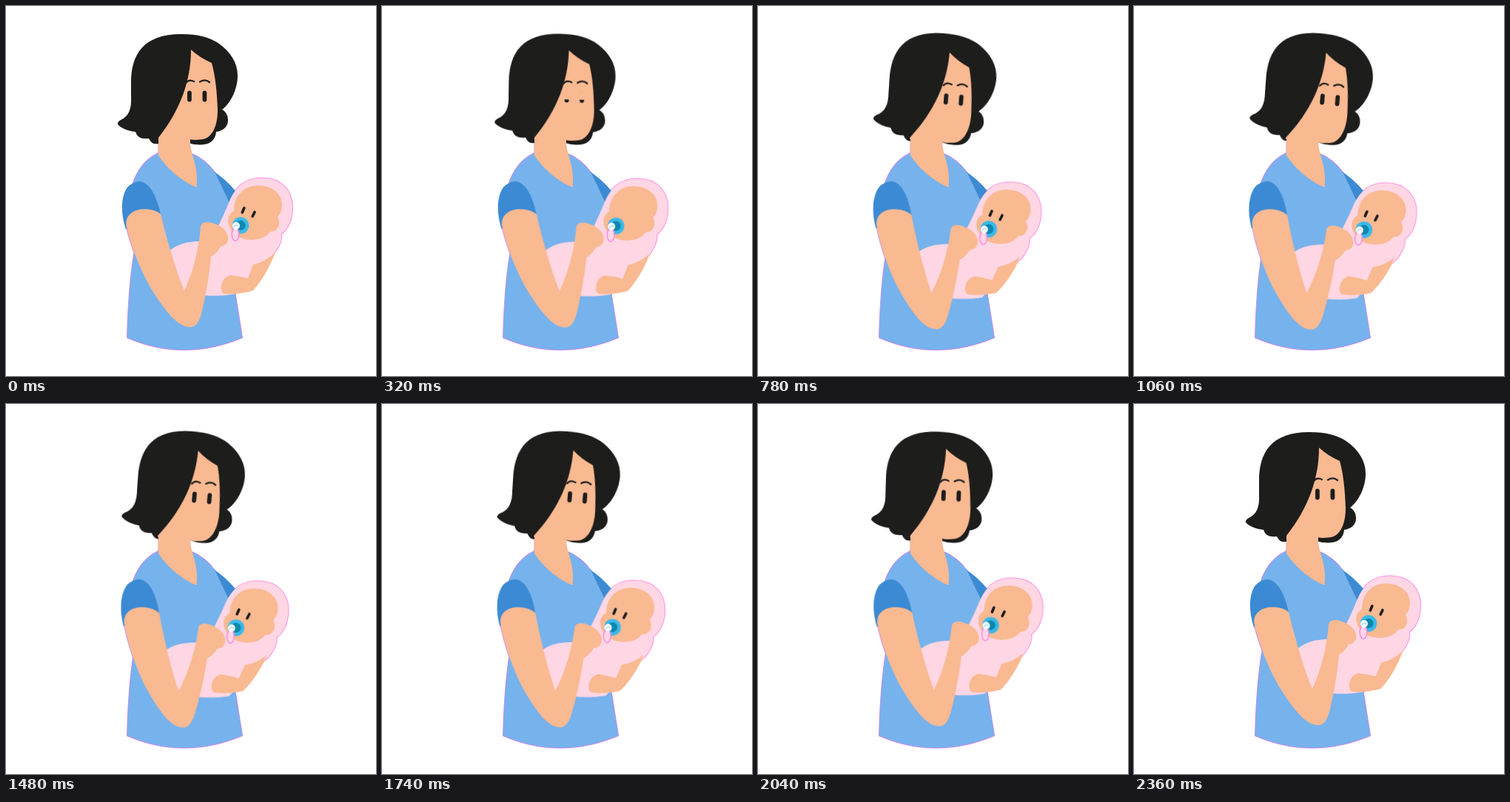
Write an HTML page that moves like this. It is 500x500 px and loops after 2380 ms.

```html
<!DOCTYPE html>
<html lang="en">
<head>
<meta charset="utf-8">
<title>Mother and baby</title>
<style>
  html, body { margin: 0; width: 100%; height: 100%; overflow: hidden; background: #fff; }
  svg { display: block; width: 100vw; height: 100vh; }
  .skin { fill: #f9b991; }
  .hair { fill: #1d1d1b; }
  .shirt { fill: #76b2ec; }
  .sleeve { fill: #3b8ad3; }
  .wrap { fill: #ffd6e3; }
  .line { fill: none; stroke: #1d1d1b; stroke-linecap: round; }
  .rim { fill: none; stroke-width: 2; }
</style>
</head>
<body>
<svg viewBox="0 0 500 500">
  <defs>
    <path id="torso" d="M206 199C187 208 176 224 170 245L174 330C167 370 165 410 164 448Q240 481 319 448L309 385L303 268L283 226C275 215 264 205 249 199Z"/>
    <path id="limb" d="M209 281C214 302 226 348 241 385C254 357 261 325 263 298Q264 292 272 292C283 293 295 299 299 308C302 316 299 324 290 325Q285 334 277 339C275 360 271 386 265 412C262 426 257 434 249 434C232 434 216 413 198 385C182 359 168 322 162.500 297C161 285 169 275.500 185 274.500Q200 273.500 209 281Z"/>
    <path id="blanket" d="M217 335C230 321 246 317 276 318Q289 295 301 266C310 244 322 232.500 347 232.500C373 233 387 250 387 272C387 288 382 300 372 308Q374 319 362 335Q351 346 334 350L327 369L310 389Q295 392 273 391.500L240 387Z"/>
  </defs>

  <g class="arm"><use href="#limb" class="rim" stroke="#c98bee"/></g>
  <use href="#torso" class="rim" stroke="#c98bee"/>
  <path class="rim" stroke="#c98bee" d="M206.500 180V200"/>
  <g class="baby"><use href="#blanket" class="rim" stroke="#ff8be4"/></g>

  <path class="sleeve" d="M280 223Q297 234 312 252L303 270Z"/>
  <use href="#torso" class="shirt"/>

  <g class="head">
    <path class="hair" d="M169 104C169 66 185 38 237 38C260 38 275 42 288 51C303 62 313 76 313 94C313 112 304 131 292 140C299 144 300 150 300 155C300 163 293 169 284 170C283 182 275 187.500 262 187.500Q254 187.500 246 185L206 186Q197 188 193 179Q178 181 175 170C165 169 155 165 151 160Q150 157 155 154C166 149 170 139 169 122Z"/>
    <g class="face">
      <path class="skin" d="M250 59Q262 70 278 77C283 95 285 115 286 140C286 165 277 180.500 262 180.500Q254 181.500 248 180L206 180V178C236 140 250 100 250 59Z"/>
      <g class="look">
        <path class="line" stroke-width="2.300" d="M243 104Q247 98.500 254 102M262 102.500Q269 98 275 103"/>
        <rect class="hair" x="245" y="114.500" width="5.800" height="15" rx="2.900"/>
        <rect class="hair" x="265.500" y="114.500" width="5.800" height="15" rx="2.900"/>
        <path class="skin lid" d="M244 114H252V130H244ZM264.500 114H272.500V130H264.500Z"/>
      </g>
    </g>
  </g>
  <path class="skin" d="M206 180L228 163L249 165V180C248 202 261 212 257.500 245C240 238 219 222 206 202Z"/>

  <g class="cradle">
    <path class="skin" d="M371 312C360 350 345 372 333 385L330 355Z"/>
  </g>
  <g class="baby">
    <use href="#blanket" class="wrap"/>
    <path class="skin" d="M308 277C308 254 324 242.500 341 242.500C360 242.500 373 254 373 269Q373 278 367 285C372 294 368 305 357 305Q349 316 333 316C318 316 308 310 304 302C298 294 299 281 308 277Z"/>
    <g class="peek">
      <path class="line" stroke-width="3.600" d="M321.800 273L319.300 279M336 278.500L333.200 284.300"/>
      <path class="skin nap" d="M315 270H340V288H315Z"/>
    </g>
    <circle cx="317" cy="296.500" r="11.300" fill="#3cb8e8"/>
    <circle cx="317" cy="296.300" r="6.600" fill="#0a88b0"/>
    <ellipse cx="310" cy="308.500" rx="4.800" ry="9" fill="#ffd6e3" stroke="#ff80e2" stroke-width="1.300"/>
    <circle cx="311" cy="297" r="5" fill="#fff"/>
    <path d="M308 299Q310 294.500 314 297" fill="none" stroke="#8fd3ee" stroke-width="1.200"/>
  </g>
  <g class="cradle">
    <path class="skin" d="M362 335C355 356 345 372 333 385Q315 390 296 389C287 388 290 365 304 364Q315 365 327 368L334 349.500Q350 346 362 335Z"/>
  </g>

  <g class="arm">
    <path class="sleeve" d="M162 302C154 278 156 256 164 245Q172 237 181 237C196 239 205 262 209 281V290H170Z"/>
    <use href="#limb" class="skin"/>
  </g>
</svg>
<script>
const LOOP = 2380;
const HEAD = 'cubic-bezier(.44,0,.16,1)';
const BODY = 'cubic-bezier(.5,0,.4,1)';
const BACK = 'cubic-bezier(.65,0,.65,1)';

function play(name, steps, origin) {
  const frames = steps.map(([time, transform, easing = 'linear']) =>
    ({ offset: time / LOOP, transform, easing }));
  for (const el of document.querySelectorAll('.' + name)) {
    el.style.transformOrigin = origin;
    el.animate(frames, { duration: LOOP, iterations: Infinity }).startTime = 0;
  }
}

// Lean into the second pose, rest, then return.
function sway(name, x, y, deg, origin, ease) {
  const rest = 'translate(0px,0px) rotate(0deg)';
  const lean = `translate(${x}px,${y}px) rotate(${deg}deg)`;
  play(name, [[0, rest, ease], [1200, lean], [1400, lean, BACK], [LOOP, rest]], origin);
}

function blink(name, top, amount, shut, open) {
  const up = 'scaleY(0)', down = `scaleY(${amount})`;
  play(name, [[0, up], [shut - 80, up], [shut, down], [open, down], [open + 80, up], [LOOP, up]],
    `0 ${top}px`);
}

sway('head', 0.8, -1, 4.2, '245px 220px', HEAD);
sway('face', -2.6, 4.6, 0.9, '250px 59px', HEAD);
sway('look', 2.6, 0, 0, '0 0', HEAD);
sway('baby', -5.7, 6.7, 1.5, '341px 275px', BODY);
sway('peek', -1.4, -1.2, 0, '0 0', BODY);
sway('cradle', 0, 0, 3.6, '275px 170px', BODY);
sway('arm', 0, 0, 3.1, '183px 245px', BODY);
blink('lid', 114, 0.72, 310, 370);
blink('nap', 270, 1, 300, 380);
</script>
</body>
</html>
```
